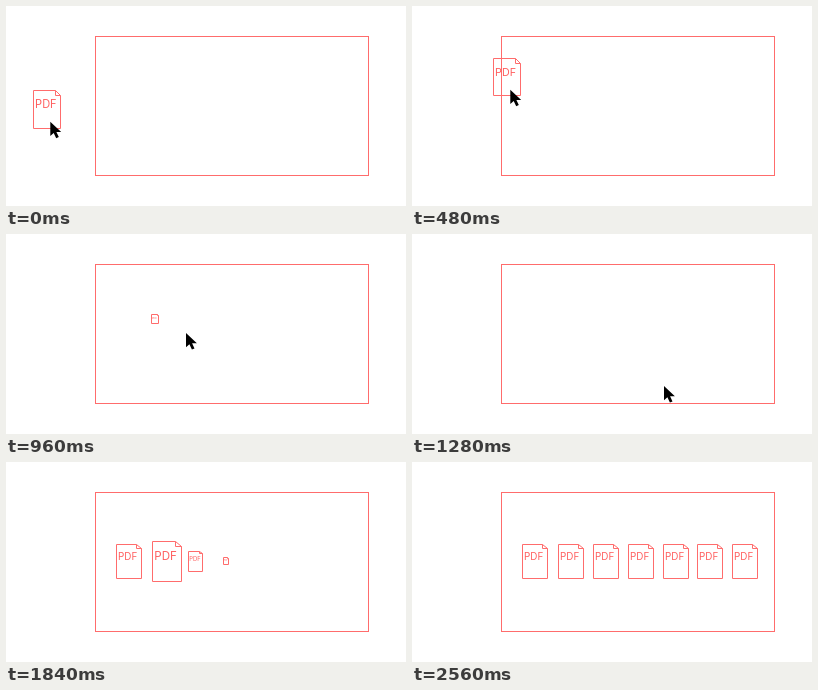
These frames come from a looping animation (400x200 px, 3.76 s). An HTML page:

```html
<!DOCTYPE html>
<html lang="en">
<head>
<meta charset="utf-8">
<title>Drop a PDF</title>
<style>
  html, body { margin: 0; width: 100%; height: 100%; overflow: hidden; background: #fff; }
  svg { display: block; width: 400px; height: 200px; }
  .line { fill: none; stroke: #ff6c6c; stroke-width: 1; }
  text { fill: #ff6060; font-family: Inter, "Liberation Sans", sans-serif; font-weight: 400; }
</style>
</head>
<body>
<svg viewBox="0 0 400 200">
  <rect class="line" x="89.5" y="30.5" width="273" height="139"/>
  <g id="scene"></g>
</svg>
<script>
const LOOP = 3760, STEP = 80;
const DROP = 9, ROW = 18; // steps at which the file is dropped and the row begins
const scene = document.getElementById('scene');

const { round } = Math;
const clamp = t => Math.min(1, Math.max(0, t));
const mix = (a, b, t) => a + (b - a) * t;
const bend = (a, b, c, t) => mix(mix(a, b, t), mix(b, c, t), t);

function file(x, y, scale) {
  const w = round(24.6 * scale), h = round(34 * scale);
  const fold = round(w * 0.2), drop = round(w * 0.17);
  return `<g transform="translate(${round(x) + 0.5} ${round(y) + 0.5})">
    <path class="line" d="M0 0H${w - fold}L${w} ${drop}V${h}H0ZM${w - fold} 0V${drop}H${w}"/>
    <text x="${w * 0.06}" y="${h * 0.47}" font-size="${h * 0.29}">PDF</text></g>`;
}

function pointer(x, y) {
  return `<path transform="translate(${x} ${y})"
    d="M0 0V14.2L3.4 11.2L5.9 16.6L8.5 15.4L6.1 10.2H10.9Z"/>`;
}

// A short pull back, then an arc into the box
function drag(step) {
  const pull = clamp((step - 1) / 2);
  const u = clamp((step - 3) / 5) ** 1.2;
  const x = round(bend(mix(27, 21, pull), 74, 135, u));
  const y = round(bend(mix(84, 89, pull), 28, 66, u));
  return file(x, y, mix(1.11, 1.075, u)) + pointer(x + 17.3, y + 31.7);
}

// The file shrinks away while the pointer speeds out through the bottom
function leave(k) {
  const gone = k / 4, u = (k / 8) ** 1.6;
  const icon = gone < 1 ? file(mix(135, 148, gone), mix(66, 85, gone), 1.075 * (1 - gone)) : '';
  return icon + pointer(round(bend(152, 222, 272, u)), round(bend(97, 91, 184, u)));
}

// Each file grows past full size, then settles
function pop(n, step) {
  const age = step - Math.floor(20 + 1.25 * n);
  if (age < 0) return '';
  const scale = age < 3 ? 0.2 + 0.97 * (age / 2) ** 1.33 : 1;
  const left = round(110.4 + 35.5 * n - 0.1 * n * n);
  return file(left + 1.4 * (1 - scale), 98.8 - 17 * scale, scale);
}

function draw(step) {
  if (step <= DROP) return drag(step);
  if (step < ROW) return leave(step - DROP);
  return Array.from({ length: 7 }, (_, n) => pop(n, step)).join('');
}

const begin = performance.now();
let shown = -1;
function tick() {
  const step = Math.floor((performance.now() - begin) % LOOP / STEP);
  if (step !== shown) scene.innerHTML = draw(shown = step);
  requestAnimationFrame(tick);
}
tick();
</script>
</body>
</html>
```
